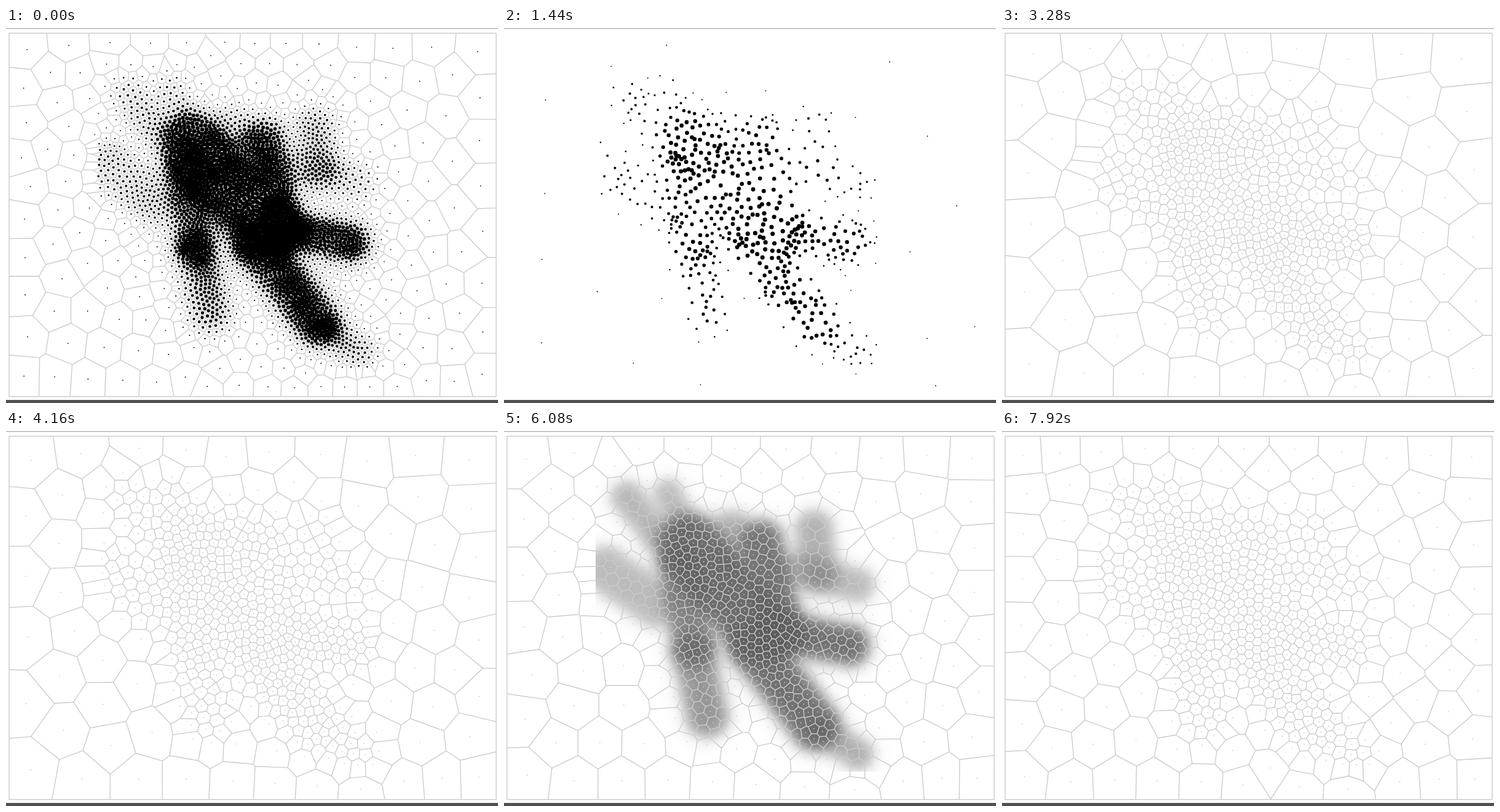
An HTML page with a canvas for the animation above (8000 ms loop, 800x610 px).

```html
<!DOCTYPE html>
<html lang="en">
<head>
<meta charset="utf-8">
<title>Weighted Voronoi stippling</title>
<style>
html, body { margin: 0; width: 100%; height: 100%; overflow: hidden; background: #fff; }
canvas { display: block; }
</style>
</head>
<body>
<canvas id="stage" width="800" height="610"></canvas>
<script>
const W = 800, H = 610, STEP = 80, FRAMES = 100, RESET = 17;
const L = 5, T = 8.5, R = 797, B = 599.5;
const ctx = document.getElementById('stage').getContext('2d');

// Soft strokes of the density image: x1, y1, x2, y2, radius, strength
const strokes = [
  [200, 108, 245, 165, 25, .45],
  [267, 102, 290, 150, 22, .42],
  [302, 188, 415, 325, 54, .9],
  [418, 180, 455, 330, 35, .85],
  [287, 220, 308, 350, 34, .75],
  [165, 225, 245, 280, 37, .42],
  [370, 160, 375, 210, 30, .45],
  [504, 160, 512, 230, 30, .48],
  [475, 225, 573, 250, 27, .42],
  [440, 325, 560, 348, 33, .88],
  [405, 350, 505, 478, 40, .88],
  [520, 490, 574, 525, 24, .5],
  [308, 360, 330, 463, 33, .65]
];

let seed = 7;
function random() {
  seed = seed + 0x6D2B79F5 | 0;
  let t = Math.imul(seed ^ seed >>> 15, 1 | seed);
  t = t + Math.imul(t ^ t >>> 7, 61 | t) ^ t;
  return ((t ^ t >>> 14) >>> 0) / 4294967296;
}

function density(x, y) {
  if (x < 149 || x > 650 || y < 53 || y > 553) return 0;
  let clear = 1;
  for (const [x1, y1, x2, y2, r, a] of strokes) {
    const dx = x2 - x1, dy = y2 - y1;
    const u = Math.max(0, Math.min(1, ((x - x1) * dx + (y - y1) * dy) / (dx * dx + dy * dy)));
    const d = Math.hypot(x - x1 - u * dx, y - y1 - u * dy);
    clear *= 1 - a / (1 + Math.exp((d - r) / 7));
  }
  return 1 - clear;
}

// Density map, its picture, and running row sums for weighted centroids
const BASE = 1 / 160, ROW = W + 1;
const rho = new Float32Array(W * H);
const mass = new Float64Array(ROW * H), moment = new Float64Array(ROW * H);
const shade = document.createElement('canvas');
shade.width = W;
shade.height = H;
const shadeCtx = shade.getContext('2d'), img = shadeCtx.createImageData(W, H);
for (let y = 0; y < H; y++) {
  for (let x = 0; x < W; x++) {
    const i = y * W + x, o = y * ROW + x, d = rho[i] = density(x, y), w = d + BASE;
    mass[o + 1] = mass[o] + w;
    moment[o + 1] = moment[o] + w * (x + .5);
    img.data.fill(255 - 162 * d, 4 * i, 4 * i + 3);
    img.data[4 * i + 3] = 255;
  }
}
shadeCtx.putImageData(img, 0, 0);
const rhoAt = ([x, y]) => rho[(y | 0) * W + (x | 0)];

function sample(n) {
  const pts = [];
  while (pts.length < n) {
    const p = [L + random() * (R - L), T + random() * (B - T)];
    if (random() < rhoAt(p) + BASE) pts.push(p);
  }
  return pts;
}

// Keep the part of a polygon nearer to p than to q
function clip(poly, p, q) {
  const dx = q[0] - p[0], dy = q[1] - p[1];
  const c = (p[0] + q[0]) / 2 * dx + (p[1] + q[1]) / 2 * dy;
  const side = poly.map(v => v[0] * dx + v[1] * dy - c);
  if (side.every(s => s <= 0)) return poly;
  const out = [];
  for (let i = 0; i < poly.length; i++) {
    const j = (i + 1) % poly.length, a = poly[i], b = poly[j], s = side[i], t = side[j];
    if (s <= 0) out.push(a);
    if (s <= 0 !== t <= 0) {
      const u = s / (s - t);
      out.push([a[0] + u * (b[0] - a[0]), a[1] + u * (b[1] - a[1])]);
    }
  }
  return out;
}

function reachOf(poly, p) {
  let far = 0;
  for (const v of poly) far = Math.max(far, Math.hypot(v[0] - p[0], v[1] - p[1]));
  return 2 * far;
}

function voronoi(pts) {
  const S = 12, nx = 67, ny = 51;
  const grid = Array.from({ length: nx * ny }, () => []);
  for (const p of pts) grid[(p[1] / S | 0) * nx + (p[0] / S | 0)].push(p);
  return pts.map(p => {
    const gx = p[0] / S | 0, gy = p[1] / S | 0;
    let poly = [[L, T], [R, T], [R, B], [L, B]], reach = reachOf(poly, p);
    for (let r = 0; r < nx && (r - 1) * S < reach; r++) {
      for (let y = Math.max(0, gy - r); y <= Math.min(ny - 1, gy + r); y++) {
        const hop = Math.abs(y - gy) === r ? 1 : 2 * r;
        for (let x = gx - r; x <= gx + r; x += hop) {
          if (x < 0 || x >= nx) continue;
          for (const q of grid[y * nx + x]) {
            if (q === p || Math.hypot(q[0] - p[0], q[1] - p[1]) >= reach) continue;
            const cut = clip(poly, p, q);
            if (cut !== poly) reach = reachOf(poly = cut, p);
          }
        }
      }
    }
    return poly;
  });
}

function lookup(sums, y, x) {
  const i = x | 0, o = y * ROW + i;
  return sums[o] + (sums[o + 1] - sums[o]) * (x - i);
}

function centroid(poly, p) {
  const ys = poly.map(v => v[1]);
  const end = Math.max(...ys);
  let m = 0, mx = 0, my = 0;
  for (let y = Math.ceil(Math.min(...ys) - .5); y + .5 < end; y++) {
    const yc = y + .5;
    let left = W, right = 0;
    poly.forEach((a, i) => {
      const b = poly[(i + 1) % poly.length];
      if (a[1] <= yc === b[1] <= yc) return;
      const x = a[0] + (yc - a[1]) / (b[1] - a[1]) * (b[0] - a[0]);
      left = Math.min(left, x);
      right = Math.max(right, x);
    });
    if (right <= left) continue;
    const w = lookup(mass, y, right) - lookup(mass, y, left);
    m += w;
    mx += lookup(moment, y, right) - lookup(moment, y, left);
    my += w * yc;
  }
  return m > 0 ? [mx / m, my / m] : p;
}

// One Lloyd step: every point moves to the weighted centre of its cell
const relax = pts => voronoi(pts).map((poly, i) => centroid(poly, pts[i]));

const states = [];
let dots = sample(3000);
for (let i = 0; i < 18; i++) dots = relax(dots);
for (let k = 0; k < FRAMES; k++) {
  dots = k === RESET ? sample(600) : relax(dots);
  states.push(dots);
}

const within = (k, a, b) => k >= a && k < b;

function draw(k) {
  const pts = states[k];
  const stippled = k < 21 || within(k, 57, 70);
  const shaded = within(k, 70, 92);
  const meshed = !(within(k, 14, 21) || within(k, 57, 61) || within(k, 70, 74));

  ctx.fillStyle = '#fff';
  ctx.fillRect(0, 0, W, H);
  if (shaded) ctx.drawImage(shade, 0, 0);
  ctx.fillStyle = '#b8b8b8';
  ctx.fillRect(0, 0, W, 1.5);
  ctx.fillStyle = '#505050';
  ctx.fillRect(0, 605, W, 5);

  if (meshed) {
    ctx.beginPath();
    for (const poly of voronoi(pts)) {
      poly.forEach(([x, y], i) => i ? ctx.lineTo(x, y) : ctx.moveTo(x, y));
      ctx.closePath();
    }
    ctx.strokeStyle = '#ccc';
    ctx.lineWidth = 1.4;
    ctx.lineJoin = 'round';
    ctx.stroke();
  }
  if (stippled) {
    ctx.fillStyle = '#000';
    ctx.beginPath();
    for (const p of pts) {
      const r = .9 + 2.7 * rhoAt(p);
      ctx.moveTo(p[0] + r, p[1]);
      ctx.arc(p[0], p[1], r, 0, 7);
    }
    ctx.fill();
  } else if (meshed) {
    ctx.fillStyle = '#ccc';
    for (const [x, y] of pts) ctx.fillRect(x - .8, y - .8, 1.6, 1.6);
  }
}

let shown = -1;
function tick(t) {
  const k = Math.floor(t / STEP) % FRAMES;
  if (k !== shown) draw(shown = k);
  requestAnimationFrame(tick);
}
draw(0);
requestAnimationFrame(tick);
</script>
</body>
</html>
```
